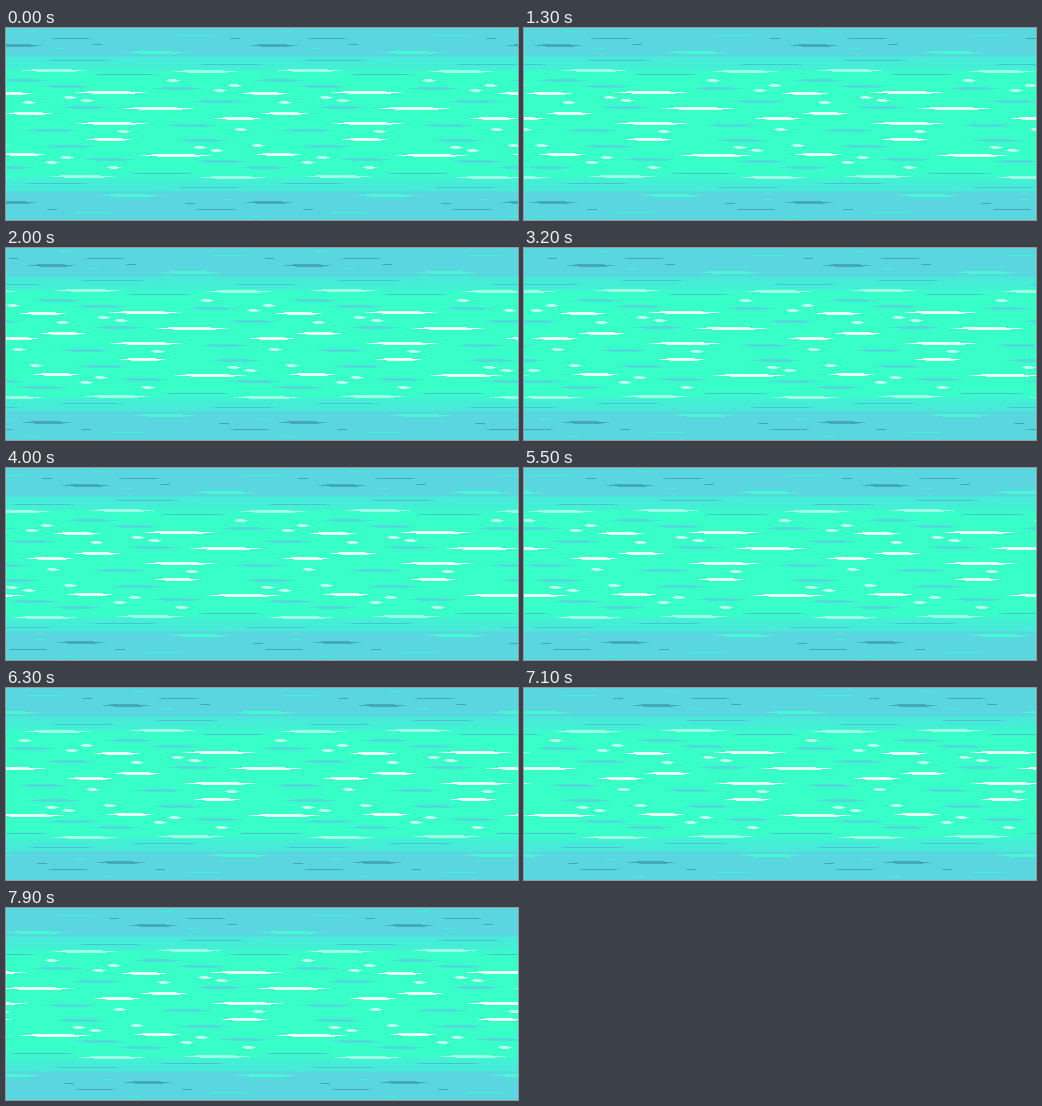
These frames come from a looping animation (512 by 192 pixels, 8 s). An HTML page with a canvas:

```html
<!DOCTYPE html>
<html lang="en">
<head>
<meta charset="utf-8">
<title>Water</title>
<style>
html, body { margin: 0; width: 100%; height: 100%; overflow: hidden; background: #5ad6e0; }
canvas { display: block; }
</style>
</head>
<body>
<canvas id="stage" width="512" height="192"></canvas>
<script>
const TILE = 256, H = 192, LOOP = 8000, STEP = 100;
const SPEED = TILE / 150; // pixels per step
const stage = document.getElementById('stage').getContext('2d');
const tile = document.createElement('canvas');
tile.width = TILE;
tile.height = H;
const g = tile.getContext('2d');

function row(cx, y, w, alpha) {
  const x = Math.round(cx - w / 2);
  g.globalAlpha = alpha;
  for (const shift of [-TILE, 0, TILE]) g.fillRect(x + shift, y, Math.round(w), 1);
  g.globalAlpha = 1;
}

// A streak has faint tips; a thick one has a shorter row above and below.
function streak(x, y, { length, color, thick }) {
  g.fillStyle = color;
  row(x, y, length, 0.5);
  row(x, y, length * 0.86, 1);
  if (!thick) return;
  for (const side of [-1, 1]) row(x + side * length * 0.03, y + side, length * 0.6, 0.9);
}

function scatter(kind, points) {
  for (const [x, y] of points) streak(x, y, kind);
}

// The lower half of the water is the upper half turned by 180 degrees.
function scatterTurned(kind, points) {
  scatter(kind, points);
  scatter(kind, points.map(([x, y]) => [275 - x, H - 1 - y]));
}

function paintWater() {
  const fill = g.createLinearGradient(0, 0, 0, H);
  const half = [[0, '#5ad6e0'], [28, '#5ad6e0'], [29, '#48ead8'], [38, '#44eed6'], [47, '#38ffc8']];
  for (const [y, color] of half) {
    fill.addColorStop(y / H, color);
    fill.addColorStop(1 - y / H, color);
  }
  g.fillStyle = fill;
  g.fillRect(0, 0, TILE, H);
}

const shade = { length: 52, color: '#50dadd', thick: true };
const line = { length: 63, color: '#4cbfda' };
const dark = { length: 48, color: '#42a6b6', thick: true };
const darkThin = { length: 40, color: '#42a6b6' };
const darkDot = { length: 10, color: '#42a6b6' };
const green = { length: 63, color: '#46fcd0', thick: true };
const greenThin = { length: 38, color: '#40f2d2' };
const greenDot = { length: 12, color: '#40f2d2' };
const mint = { length: 66, color: '#a4ffe6', thick: true };
const glint = { length: 14, color: '#c4ffee', thick: true };
const bright = { length: 72, color: '#f0fff4', thick: true };
const brightShort = { length: 46, color: '#f4fff4', thick: true };

paintWater();
scatterTurned(shade, [[17, 52], [60, 58], [172, 60], [212, 73], [79, 79]]);
scatter(shade, [[185, 97], [45, 102]]);
scatterTurned(line, [[72, 32], [225, 36], [119, 46]]);
scatterTurned(dark, [[12, 17]]);
scatterTurned(darkThin, [[65, 10]]);
scatterTurned(darkDot, [[91, 16], [229, 10]]);
scatterTurned(green, [[150, 24]]);
scatterTurned(greenThin, [[188, 7]]);
scatterTurned(greenDot, [[25, 3], [53, 20], [121, 33]]);
scatterTurned(mint, [[48, 42], [199, 43]]);
scatterTurned(glint, [[167, 52], [229, 57], [214, 62], [64, 69], [81, 72], [23, 74]]);
scatter(glint, [[235, 101], [118, 103]]);
scatterTurned(bright, [[105, 64]]);
scatter(bright, [[152, 80], [106, 95]]);
scatterTurned(brightShort, [[3, 65]]);
scatter(brightShort, [[23, 85], [232, 90], [103, 111]]);

function frame(now) {
  const step = Math.floor(now % LOOP / STEP);
  const x = Math.round(step * SPEED) % TILE;
  for (let i = -1; i < 2; i++) stage.drawImage(tile, x + i * TILE, 0);
  requestAnimationFrame(frame);
}
requestAnimationFrame(frame);
</script>
</body>
</html>
```
